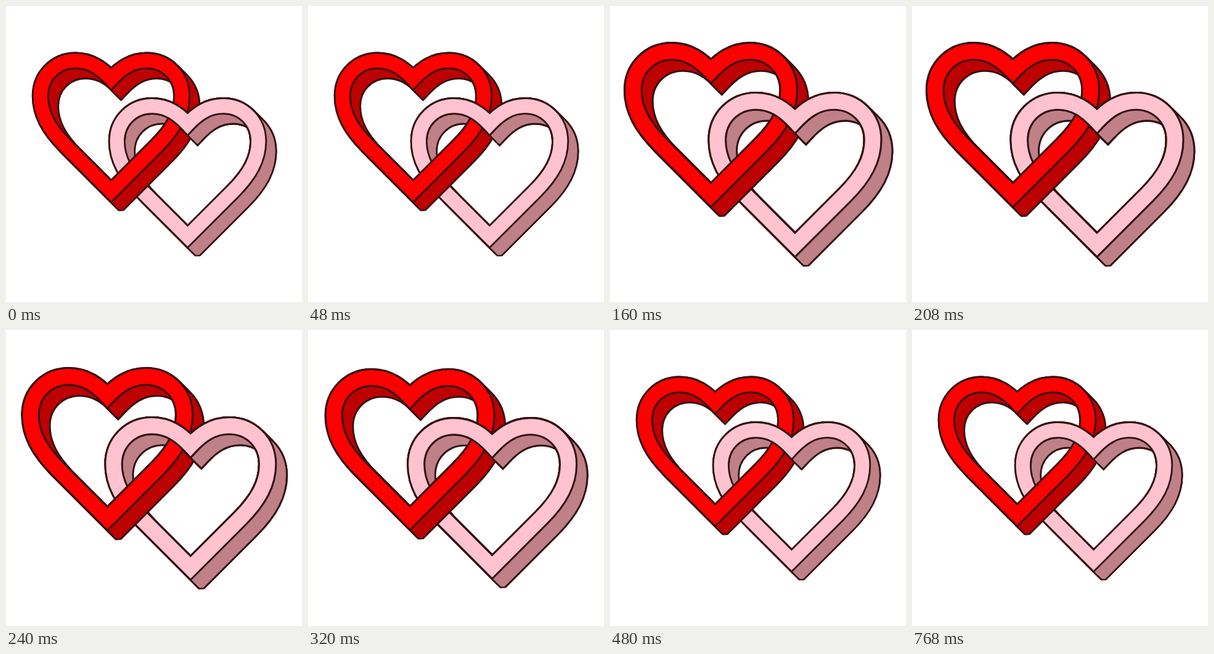
These frames come from a looping animation (480x480 px, 960 ms). An HTML page:

```html
<!DOCTYPE html>
<html lang="en">
<head>
<meta charset="utf-8">
<title>Linked hearts</title>
<style>
  html, body { margin: 0; width: 100%; height: 100%; overflow: hidden; background: #fff; }
  svg { display: block; width: 100vw; height: 100vh; }
</style>
</head>
<body>
<svg viewBox="0 0 480 480">
  <defs>
    <path id="heart" fill="none" stroke-miterlimit="10" d="M170.5 117.8
      C155.5 101.8 138 88.6 113 88.6 C81 88.6 55.8 113 55.8 146 C55.8 174 69 199 97 227
      L170.5 300.5 L244 227 C272 199 285.2 174 285.2 146 C285.2 113 260 88.6 228 88.6
      C203 88.6 185.5 101.8 170.5 117.8Z"/>
    <clipPath id="tip"><path d="M0 0H480V332.2H0Z"/></clipPath>
    <mask id="upper" maskUnits="userSpaceOnUse" x="0" y="0" width="480" height="480">
      <path fill="#fff" d="M150 130H330V215H150Z"/>
    </mask>
    <mask id="right" maskUnits="userSpaceOnUse" x="0" y="0" width="480" height="480">
      <path fill="#fff" d="M200 117L340 257H480V0H200Z"/>
    </mask>
  </defs>
  <g id="stage"></g>
</svg>
<script>
const INK = '#331212', BAND = 25.2, LINE = 2.8, DEPTH = 16.3;
const RED = ['#ff0000', '#bd0000'], PINK = ['#ffc3d0', '#c08088'];
const stage = document.getElementById('stage');

const ring = (color, width, shift = 0) =>
  `<use href="#heart" x="${shift}" y="${shift}" stroke="${color}" stroke-width="${width}"/>`;

// Repeating the ring along the depth direction makes the solid side wall.
const sweep = (color, width) =>
  Array.from({ length: 18 }, (_, i) => ring(color, width, DEPTH * i / 17)).join('');

const front = ([face]) => ring(INK, BAND + LINE) + ring(face, BAND - LINE);

const solid = colors => `<g clip-path="url(#tip)">
  ${sweep(INK, BAND + LINE)}${sweep(colors[1], BAND - LINE)}
  <path d="M183 331.2H191" stroke="${INK}" stroke-width="2"/></g>${front(colors)}`;

const pinkPlace = body => `<g transform="translate(124 73.5)">${body}</g>`;
const masked = (id, body) => `<g mask="url(#${id})">${body}</g>`;

// Red passes behind the top of the pink heart and over its lower left side.
stage.innerHTML = pinkPlace(solid(PINK)) + solid(RED) +
  masked('right', pinkPlace(solid(PINK))) +
  masked('upper', pinkPlace(front(PINK)));

const LOOP = 960, STEP = 80;
const beat = [1, 1.066, 1.1, 1.088, 1.076, 1.037];

function draw(time) {
  const scale = beat[Math.floor(time % LOOP / STEP)] || 1;
  stage.setAttribute('transform', `translate(240 240) scale(${scale}) translate(-240 -240)`);
}

const start = performance.now();
function tick() {
  draw(performance.now() - start);
  requestAnimationFrame(tick);
}
draw(0);
requestAnimationFrame(tick);
</script>
</body>
</html>
```
